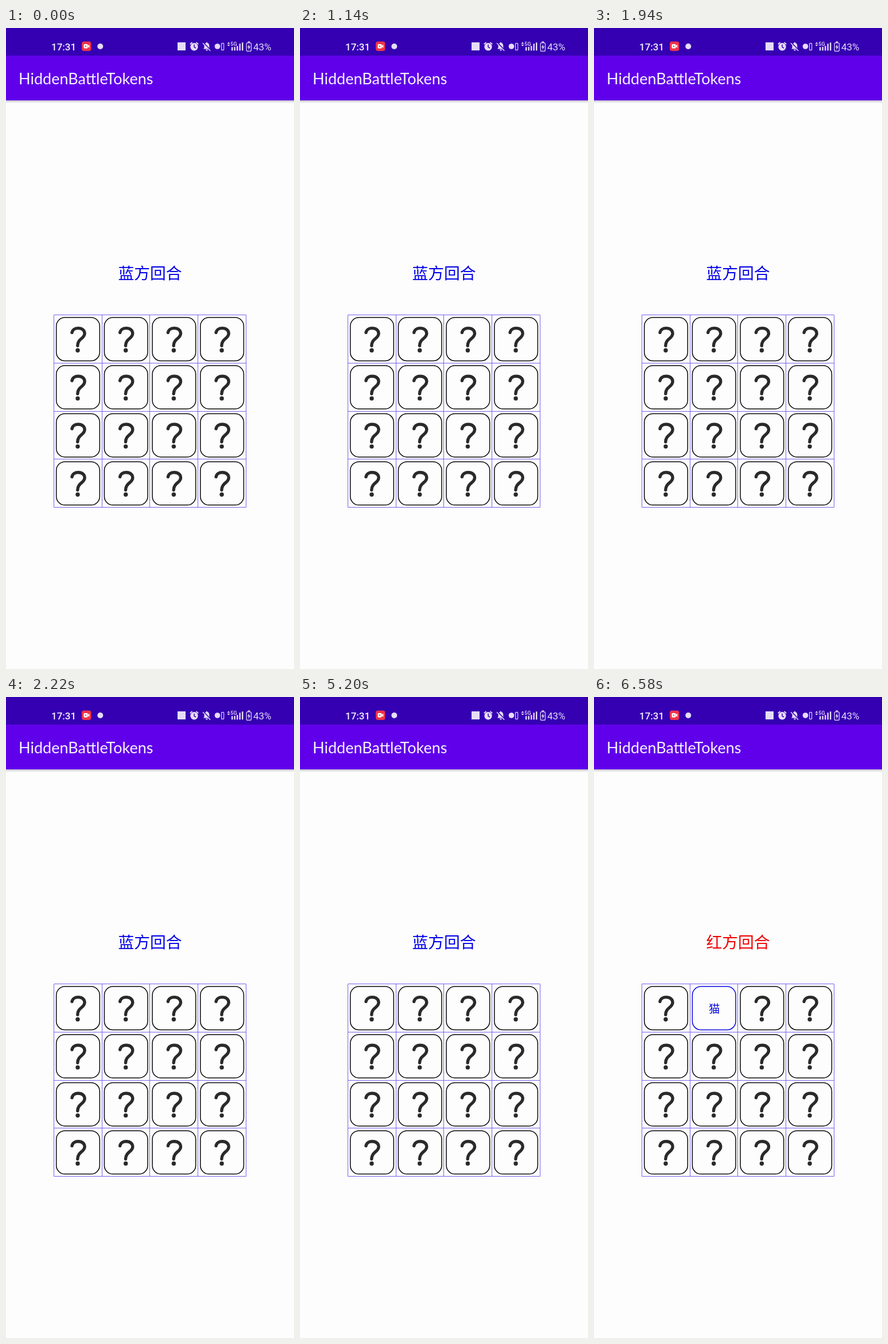
These frames come from a looping animation (502 by 1116 pixels, 8000 ms). An HTML page with a canvas:

```html
<!DOCTYPE html>
<html lang="zh">
<head>
<meta charset="utf-8">
<title>HiddenBattleTokens</title>
<style>
  html, body { margin: 0; width: 100%; height: 100%; overflow: hidden; background: #fdfdfd; }
  canvas { display: block; width: 502px; height: 1116px; }
</style>
</head>
<body>
<canvas id="stage" width="502" height="1116"></canvas>
<script>
const ctx = document.getElementById('stage').getContext('2d');
const LOOP = 8000;
const REVEAL_AT = 5300;
const GRID = { x: 83.5, y: 499.8, step: 83.7, count: 4 };
const REVEALED = { col: 1, row: 0 };
const CJK = '"Noto Sans CJK SC", "Noto Sans CJK", sans-serif';
const PALE = '#e6dcf8';

function text(str, x, y, font, color, align = 'left') {
  ctx.font = font;
  ctx.fillStyle = color;
  ctx.textAlign = align;
  ctx.fillText(str, x, y);
}

function rect(x, y, w, h, color) {
  ctx.fillStyle = color;
  ctx.fillRect(x, y, w, h);
}

function disc(x, y, r, color) {
  ctx.fillStyle = color;
  ctx.beginPath();
  ctx.arc(x, y, r, 0, Math.PI * 2);
  ctx.fill();
}

function roundBox(x, y, w, h, r) {
  ctx.beginPath();
  ctx.roundRect(x, y, w, h, r);
}

function stroke(path, color, width) {
  ctx.strokeStyle = color;
  ctx.lineWidth = width;
  ctx.stroke(new Path2D(path));
}

function fill(path, color) {
  ctx.fillStyle = color;
  ctx.fill(new Path2D(path));
}

function drawRecorder() {
  ctx.fillStyle = '#ee3448';
  roundBox(132, 23.5, 16.5, 16.5, 4);
  ctx.fill();
  ctx.fillStyle = '#fff';
  roundBox(135.5, 28, 7, 7.5, 1.5);
  ctx.fill();
  fill('M142.5 31 L145.3 28.8 V34.8 L142.5 32.5 Z', '#fff');
  disc(139, 31.8, 1.2, '#ee3448');
}

function drawAlarm() {
  disc(328, 32.8, 6.7, PALE);
  stroke('M320.8 28.2 L324.6 25 M331.4 25 L335.2 28.2', PALE, 1.8);
  stroke('M328 28.8 V33.2 L331 35', '#3700b3', 1.5);
}

function drawMutedBell() {
  fill('M344 36.5 L345.5 34.5 V31 C345.5 28 347 26.4 349 26 V24.7 H350.8 V26 C353 26.5 354.3 28 354.3 31 V34.5 L356 36.5 Z', PALE);
  fill('M348 37.5 H352 A2 2 0 0 1 348 37.5 Z', PALE);
  stroke('M343.8 25.7 L357 39.4', '#3700b3', 2.4);
  stroke('M343 26.2 L356.2 39.8', PALE, 1.4);
}

function drawSignal() {
  fill('M385.5 27.4 L388 24.6 L390.5 27.4 Z M385.5 29 H390.5 L388 31.8 Z', PALE);
  text('5G', 391.3, 31.3, '500 9px Roboto, sans-serif', PALE);
  [6, 6.5, 8, 12, 14].forEach((h, i) => rect(393 + i * 4.5, 39.3 - h, 2.4, h, PALE));
}

function drawBattery() {
  ctx.strokeStyle = PALE;
  ctx.lineWidth = 1.2;
  roundBox(419.2, 25.8, 8.2, 14.6, 2);
  ctx.stroke();
  rect(421.5, 23.4, 3.6, 2, PALE);
  fill('M424.2 28 L420.8 33.8 H422.9 L422.3 38.4 L426 32.3 H423.7 Z', PALE);
}

function drawStatusBar() {
  rect(0, 0, 502, 48, '#3500b2');
  text('17:31', 79, 38.6, '500 17px Roboto, sans-serif', '#f5f0ff');
  drawRecorder();
  disc(164.3, 32, 5, PALE);
  rect(299, 25, 14, 14, PALE);
  drawAlarm();
  drawMutedBell();
  disc(368.5, 32, 4.8, PALE);
  ctx.strokeStyle = PALE;
  ctx.lineWidth = 1.1;
  roundBox(375.5, 26.6, 4.2, 11.8, 1);
  ctx.stroke();
  drawSignal();
  drawBattery();
  text('43%', 431, 38.6, '400 17px Roboto, sans-serif', PALE);
}

function drawAppBar() {
  const shade = ctx.createLinearGradient(0, 126, 0, 131);
  shade.addColorStop(0, 'rgba(60,50,80,.28)');
  shade.addColorStop(1, 'rgba(60,50,80,0)');
  rect(0, 126, 502, 5, shade);
  rect(0, 48, 502, 78, '#6000ea');
  text('HiddenBattleTokens', 22, 98, '400 27px Lato, sans-serif', '#f8f2ff');
}

function drawLines() {
  const { x, y, step, count } = GRID;
  const size = step * count;
  ctx.strokeStyle = '#7a62ec';
  ctx.lineWidth = 1;
  ctx.beginPath();
  for (let i = 0; i <= count; i++) {
    const px = Math.floor(x + i * step) + 0.5;
    const py = Math.floor(y + i * step) + 0.5;
    ctx.moveTo(px, y);
    ctx.lineTo(px, y + size);
    ctx.moveTo(x, py);
    ctx.lineTo(x + size, py);
  }
  ctx.stroke();
}

function drawCard(col, row, revealed) {
  ctx.save();
  ctx.translate(GRID.x + col * GRID.step, GRID.y + row * GRID.step);
  ctx.strokeStyle = revealed ? '#0808dc' : '#080808';
  ctx.lineWidth = 1.5;
  roundBox(4.2, 4.3, 75.6, 75.4, 15);
  ctx.stroke();
  if (revealed) {
    text('猫', 126 - GRID.x, 50.3, '400 19.5px ' + CJK, '#0808dc', 'center');
  } else {
    ctx.lineCap = 'round';
    stroke('M31.5 30.5 C32.4 25.6 36.7 22.8 42.4 22.8 C49.2 22.8 53.6 26.7 53.6 32 C53.6 41.2 41.6 40.6 41.3 53.3', '#2a2a2c', 5.4);
    disc(41.5, 61.4, 3.7, '#2a2a2c');
  }
  ctx.restore();
}

function render(time) {
  const flipped = time >= REVEAL_AT;
  rect(0, 0, 502, 1116, '#fdfdfd');
  drawAppBar();
  drawStatusBar();
  text(flipped ? '红方回合' : '蓝方回合', 251, 437, '400 27.8px ' + CJK, flipped ? '#f00000' : '#0000e8', 'center');
  drawLines();
  for (let row = 0; row < GRID.count; row++) {
    for (let col = 0; col < GRID.count; col++) {
      drawCard(col, row, flipped && col === REVEALED.col && row === REVEALED.row);
    }
  }
}

const start = performance.now();
function tick() {
  render((performance.now() - start) % LOOP);
  requestAnimationFrame(tick);
}
tick();
</script>
</body>
</html>
```
